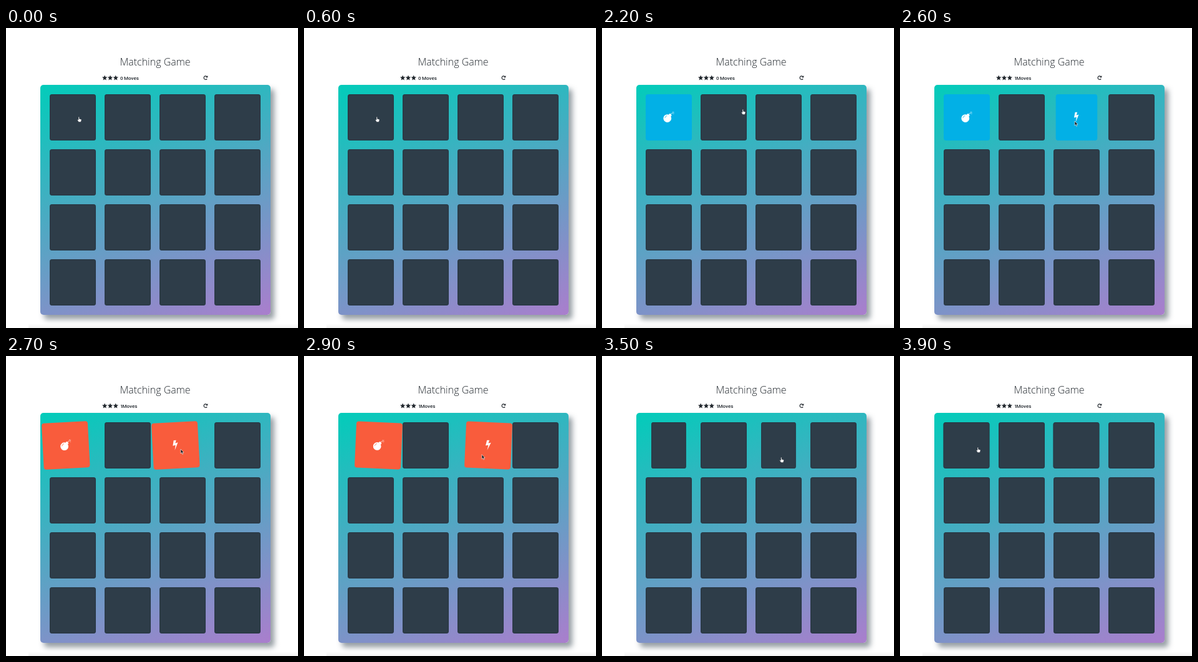
An HTML page for the animation above (4 s loop, 468 px wide and 480 px high).

```html
<!DOCTYPE html>
<html lang="en">
<head>
<meta charset="utf-8">
<title>Matching Game</title>
<style>
  html, body { margin: 0; width: 100%; height: 100%; overflow: hidden; background: #fff; }
  #stage { position: relative; width: 468px; height: 480px; overflow: hidden; background: #fff; }
  #deck {
    position: absolute; left: 54.5px; top: 90.5px; width: 369.5px; height: 368.5px; border-radius: 5px;
    background: linear-gradient(160deg, #02ccba, #aa7ecd);
    box-shadow: 6px 7px 9px rgba(46, 61, 73, .5);
  }
  .card {
    position: absolute; width: 73.5px; height: 73.5px; border-radius: 4px;
    background: #2e3d49; box-shadow: inset 0 0 2px #202c37;
  }
  .card svg { position: absolute; inset: 0; width: 100%; height: 100%; visibility: hidden; }
  .open { background: #02b0e6; color: #02b0e6; box-shadow: none; }
  .miss { background: #f95c3c; color: #f95c3c; box-shadow: none; }
  .open svg, .miss svg { visibility: visible; }
  #overlay { position: absolute; inset: 0; }
  #floor {
    position: absolute; left: 36px; right: 0; bottom: 0; height: 7px;
    background: linear-gradient(#fff, #f1f1f1);
  }
  .title { font: 300 16px "Open Sans", sans-serif; fill: #22282e; }
  .score { font: 500 8px Roboto, sans-serif; fill: #22282e; }
</style>
</head>
<body>
<div id="stage">
  <div id="floor"></div>
  <div id="deck"></div>
  <div id="cards"></div>
  <svg id="overlay" width="468" height="480" viewBox="0 0 468 480">
    <defs>
      <path id="star" fill="#22282e" d="M0-4.3 1.2-1.5 4.2-1.2 1.9.8 2.6 3.8 0 2.2-2.6 3.8-1.9.8-4.2-1.2-1.2-1.5Z"/>
    </defs>
    <text class="title" x="239" y="60" text-anchor="middle">Matching Game</text>
    <use href="#star" x="158.2" y="79.7"/>
    <use href="#star" x="167" y="79.7"/>
    <use href="#star" x="175.8" y="79.7"/>
    <text class="score" id="count" x="183" y="82.7">0</text>
    <text class="score" id="label" y="82.7">Moves</text>
    <path d="M322.2 81.3A2.8 2.8 0 1 1 321.8 77.6" fill="none" stroke="#22282e" stroke-width="1.2"/>
    <path d="M323.3 75.9V79.2H320Z" fill="#22282e"/>
    <g id="cursor">
      <path id="hand" fill="#fff" stroke="#222c36" stroke-width=".6"
        d="M-1 .6Q-.2-.6.6.6V3.2L3.5 4Q4.2 4.3 4 5.6L3 8.4H-.5L-3 5Q-2.6 4-1 5Z"/>
      <path id="arrow" fill="#14181c" stroke="#fff" stroke-width=".6"
        d="M0 0V7L1.6 5.6 2.7 8.3 3.9 7.8 2.8 5.2H5Z"/>
    </g>
  </svg>
</div>
<script>
const LOOP = 4000, STEP = 100;
const $ = id => document.getElementById(id);

const icons = {
  0: `<circle cx="-2" cy="1.8" r="6.4"/><path d="M0-4.6 2.4-6 5-3.3 3.6-1Z"/>
      <path d="M3.5-4.5Q4.5-7 6.5-6.2M6.6-8.8V-7.3M8.8-6.6H7.6M8.4-8.6 7.5-7.6M8.2-4.6 7.4-5.4"
        fill="none" stroke="#fff" stroke-width=".7"/>
      <path d="M-6 1.3Q-5.5-2-2.4-2.4" fill="none" stroke="currentColor" stroke-width=".7"/>`,
  2: `<path d="M-2.4-8H1.6L0-3.2 4.2-4.2-1.4 8 .2-.2-4.2.8Z"/>`
};

const cards = Array.from({ length: 16 }, (_, i) => {
  const card = document.createElement('div');
  card.className = 'card';
  card.style.left = 70 + i % 4 * 88 + 'px';
  card.style.top = 106 + Math.floor(i / 4) * 88 + 'px';
  if (icons[i]) card.innerHTML = `<svg viewBox="-36.75 -36.75 73.5 73.5" fill="#fff">${icons[i]}</svg>`;
  $('cards').append(card);
  return card;
});

const clamp = x => Math.min(1, Math.max(0, x));

// CSS "ease": cubic-bezier(.25, .1, .25, 1)
function ease(x) {
  x = clamp(x);
  let lo = 0, hi = 1;
  for (let i = 0; i < 24; i++) {
    const s = (lo + hi) / 2;
    if (.75 * s * (1 - s) + s ** 3 < x) lo = s; else hi = s;
  }
  return .3 * lo * (1 - lo) ** 2 + 3 * lo * lo * (1 - lo) + lo ** 3;
}

// Interpolates rows of [time, x, y, ...]
function track(rows, t, curve) {
  let i = 0;
  while (i < rows.length - 2 && t >= rows[i + 1][0]) i++;
  const a = rows[i], b = rows[i + 1];
  const k = curve(clamp((t - a[0]) / (b[0] - a[0])));
  return [1, 2].map(n => a[n] + (b[n] - a[n]) * k);
}

// progress, shift in %, rotation in degrees
const wobble = [[0, 0, 0], [.15, -25, -5], [.3, 20, 3], [.45, -15, -3], [.6, 10, 2], [.75, -5, -1], [1, 0, 0]];
const WOBBLE_AT = 2647, CLOSE_AT = 3415, FLIP = 500;

const path = [
  [0, 117, 142], [2100, 117, 142], [2200, 226, 130], [2300, 276, 146], [2400, 280, 149],
  [2700, 280, 149], [3000, 287.5, 162], [3500, 287.5, 162], [3900, 125, 146], [4000, 125, 146]
];
// Spans in which the pointer is an arrow
const arrowSpans = [[1200, 2200], [2400, 3500]];

const flip = angle => `scaleX(${Math.cos(angle * Math.PI / 180)})`;

function poseCard(card, openAt, t) {
  let state = '', transform = '';
  if (t >= CLOSE_AT) {
    transform = flip(180 * ease((t - CLOSE_AT) / FLIP));
  } else if (t >= WOBBLE_AT) {
    const [shift, turn] = track(wobble, (Math.min(t, 3300) - WOBBLE_AT) / 1000, ease);
    state = ' miss';
    transform = `translateX(${shift}%) rotate(${turn}deg)`;
  } else if (t >= openAt) {
    state = ' open';
    transform = flip(180 * (1 - ease((t - openAt) / FLIP)));
  }
  card.className = 'card' + state;
  card.style.transform = transform;
}

function draw(time) {
  const t = Math.floor((time % LOOP) / STEP) * STEP;
  poseCard(cards[0], 1310, t);
  poseCard(cards[2], 2320, t);

  const moves = t >= 2400 ? 1 : 0;
  $('count').textContent = moves;
  $('label').setAttribute('x', moves ? 186.6 : 189);

  const [x, y] = track(path, t, k => k);
  const isArrow = arrowSpans.some(([from, to]) => t >= from && t < to);
  $('cursor').setAttribute('transform', `translate(${x} ${y})`);
  $('arrow').style.display = isArrow ? '' : 'none';
  $('hand').style.display = isArrow ? 'none' : '';
}

const start = performance.now();
function tick() {
  draw(performance.now() - start);
  requestAnimationFrame(tick);
}
tick();
</script>
</body>
</html>
```
